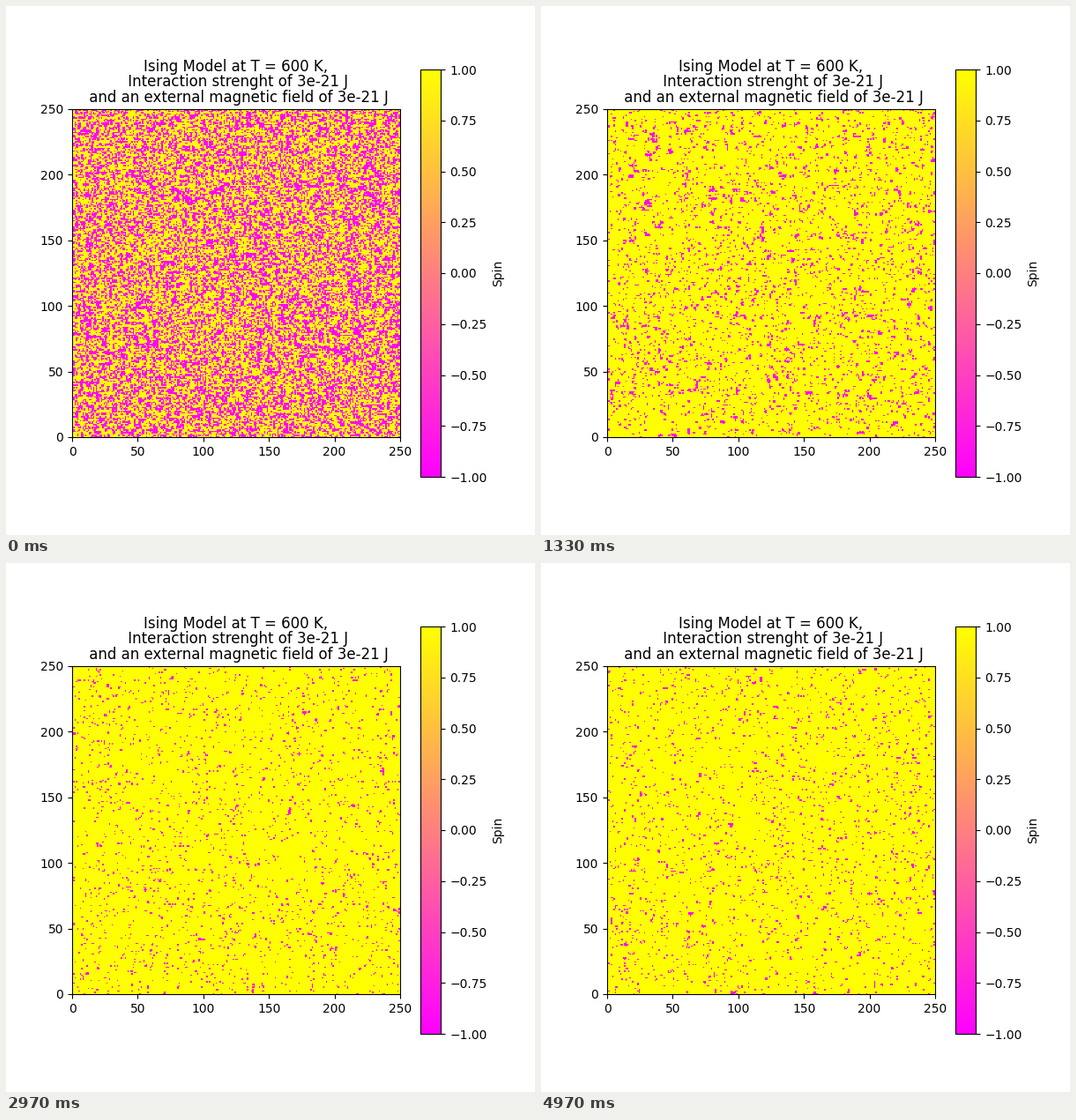
These frames come from a looping animation (600x600 px, 5000 ms). A matplotlib script:

```python
import numpy as np
import matplotlib.pyplot as plt
from matplotlib.animation import FuncAnimation

SIZE = 250
FRAMES = 150
LOOP_MS = 5000
WARM_UP = 5         # updates made before the first picture
TRY_RATE = 0.1      # share of spins tried per update

T = 600
J = 3e-21
H = 3e-21
BETA = 1 / (1.380649e-23 * T)

rng = np.random.default_rng(7)
checker = np.indices((SIZE, SIZE)).sum(axis=0) % 2


def neighbours(spins):
    return sum(np.roll(spins, step, axis) for step in (-1, 1) for axis in (0, 1))


def update(spins):
    """Metropolis update of a random share of the lattice."""
    tried = rng.random(spins.shape) < TRY_RATE
    for parity in (0, 1):
        cost = 2 * spins * (J * neighbours(spins) + H)
        accept = rng.random(spins.shape) < np.exp(-BETA * cost)
        spins = np.where(tried & accept & (checker == parity), -spins, spins)
    return spins


def simulate():
    spins = rng.choice([-1, 1], size=(SIZE, SIZE))
    for _ in range(WARM_UP):
        spins = update(spins)
    states = [spins]
    while len(states) < FRAMES:
        states.append(update(states[-1]))
    return states


states = simulate()

fig, ax = plt.subplots(figsize=(6, 6), dpi=100)
image = ax.imshow(states[0], cmap="spring", vmin=-1, vmax=1, origin="lower",
                  extent=(0, SIZE, 0, SIZE), interpolation="nearest")
ax.set_title(f"Ising Model at T = {T} K,\n Interaction strenght of {J} J"
             f"\n and an external magnetic field of {H} J", linespacing=0.96)
fig.colorbar(image, ax=ax, label="Spin")


def draw(i):
    image.set_data(states[i])
    return [image]


anim = FuncAnimation(fig, draw, frames=FRAMES, interval=LOOP_MS / FRAMES,
                     repeat=True, repeat_delay=0)
plt.show()
```
